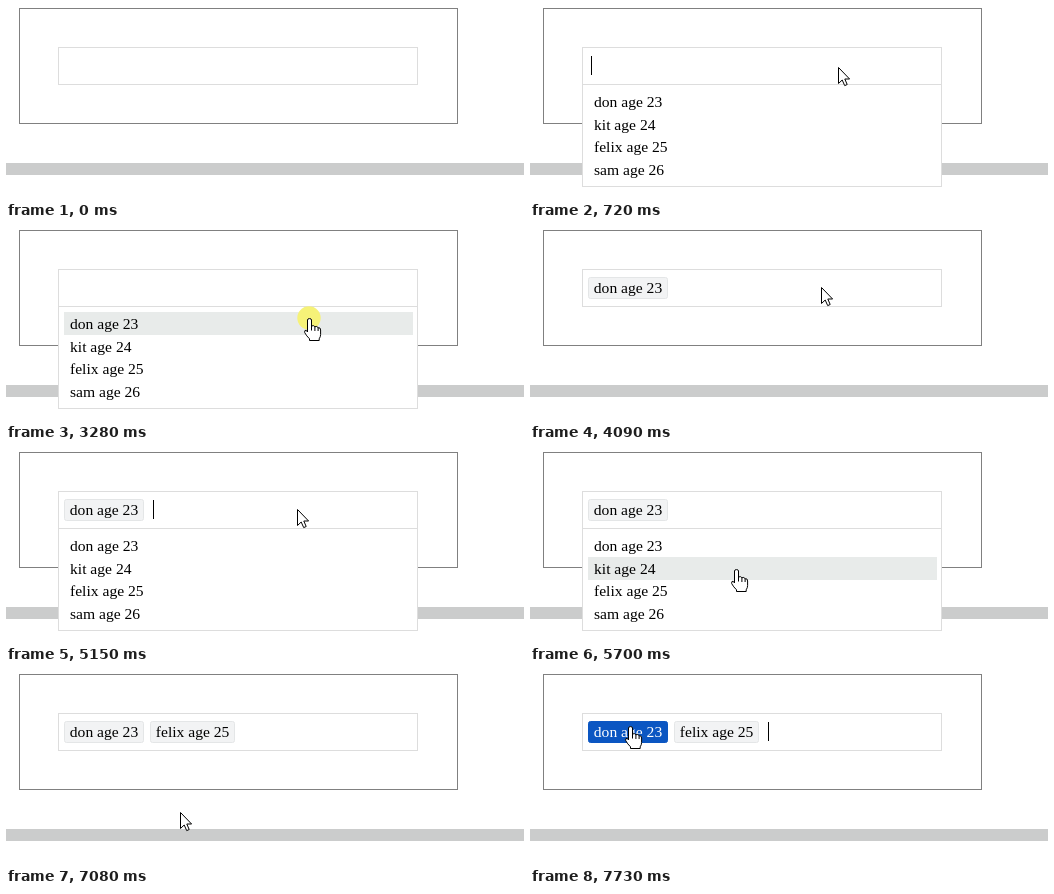
These frames come from a looping animation (518 px wide and 194 px high, 8 s). An HTML page:

```html
<!DOCTYPE html>
<html lang="en">
<head>
<meta charset="utf-8">
<title>Tag picker</title>
<style>
  html, body { margin: 0; width: 100%; height: 100%; overflow: hidden; background: #fff; }
  svg { display: block; width: 518px; height: 194px; }
  text { font: 15.6px "Liberation Serif", "Times New Roman", serif; fill: #000; white-space: pre; }
  .line { fill: #fff; stroke: #ddd; }
  .tag rect { fill: #f2f3f4; stroke: #e4e6e7; }
  .tag.hot rect { fill: #0b56c2; stroke: #0b56c2; }
  .tag.hot text { fill: #fff; }
  #arrow, #hand { fill: #fff; stroke: #000; stroke-linejoin: round; }
</style>
</head>
<body>
<svg viewBox="0 0 518 194">
  <rect y="157" width="518" height="12" fill="#cbcccc"/>
  <rect x="13.5" y="2.5" width="438" height="115" fill="#fff" stroke="#808080"/>
  <rect class="line" x="52.5" y="41.5" width="359" height="37"/>
  <g id="menu">
    <rect class="line" x="52.5" y="78.5" width="359" height="102"/>
    <rect id="hover" x="58" width="349" height="23" fill="#e8ebea"/>
  </g>
  <g id="tags"></g>
  <rect id="caret" y="50" width="1" height="19"/>
  <g id="mouse">
    <circle id="press" r="11.7" fill="#f6f278"/>
    <path id="arrow" d="M.5 -.5V15.5L4.2 12L6.7 17.6L9.2 16.5L6.8 11H11.6Z"/>
    <path id="hand" d="M-1.5 14V2Q-1.5 .6 .5 .6Q2.5 .6 2.5 2V8Q4.7 6.9 5.9 8.7Q8.1 7.8 9.1 9.7Q11.6 9.2 11.6 12V16.5Q11.6 18.8 10.2 20.8V22.5H.5V20.8Q-2.5 18-4.3 14.6Q-4.7 12-2.9 12.2ZM2.5 8V12.5M5.9 8.7V13M9.1 9.7V13"/>
  </g>
</svg>
<script>
const LOOP = 8000, HOLD = 130, BLINK = 525;
const LEFT = 52, ROW_TOP = 84, ROW_H = 22.5;
const people = ["don age 23", "kit age 24", "felix age 25", "sam age 26"];

const [openClick, firstPick, focusClick, secondPick] = [560, 3280, 4140, 6310];
const clicks = [openClick, firstPick, focusClick, secondPick];
const reopen = 5150;
const focuses = [...clicks.map(c => c + HOLD), reopen].sort((a, b) => a - b);

const enter = { x: 403, y: 196 };
const stops = [
  { at: 60, ms: 460, x: 308, y: 62 },
  { at: 2270, ms: 50, x: 308, y: 72 },
  { at: 2700, ms: 280, x: 303, y: 90 },
  { at: 3760, ms: 330, x: 291, y: 60 },
  { at: 5320, ms: 580, x: 174, y: 141 },
  { at: 7340, ms: 390, x: 100, y: 54 }
];

const $ = id => document.getElementById(id);
const show = (el, on) => { el.style.visibility = on ? "visible" : "hidden"; };
const ease = k => k * k * (3 - 2 * k);

function add(parent, name, attrs, text) {
  const el = document.createElementNS("http://www.w3.org/2000/svg", name);
  for (const key in attrs) el.setAttribute(key, attrs[key]);
  if (text) el.textContent = text;
  return parent.appendChild(el);
}

people.forEach((p, i) =>
  add($("menu"), "text", { x: 64, y: Math.round(101 + i * 22.6) }, p));

// Each tag follows the previous one and fits its label.
function makeTag(label, x, from) {
  const el = add($("tags"), "g", { class: "tag" });
  const box = add(el, "rect", { x: x + .5, y: 49.5, height: 21, rx: 2 });
  const text = add(el, "text", { x: x + 5.8, y: 65 }, label);
  const w = Math.floor(text.getComputedTextLength() + 12);
  box.setAttribute("width", w - 1);
  return { el, x, end: x + w, from };
}
const first = makeTag(people[0], LEFT + 6, firstPick + HOLD);
const second = makeTag(people[2], first.end + 6, secondPick + HOLD);
const tags = [first, second];

function pointer(t) {
  let { x, y } = enter;
  for (const s of stops) {
    const k = ease(Math.min(1, Math.max(0, (t - s.at) / s.ms)));
    x += (s.x - x) * k;
    y += (s.y - y) * k;
  }
  return [Math.round(x), Math.round(y)];
}

function draw(t) {
  const [x, y] = pointer(t);
  const pressed = clicks.some(c => t >= c && t < c + HOLD);
  const open = t >= openClick + HOLD && t < first.from || t >= reopen && t < second.from;
  const row = Math.floor((y - ROW_TOP) / ROW_H);
  const onRow = open && row >= 0 && row < people.length && x >= 58 && x < 407;

  let end = LEFT, onTag = false;
  for (const tag of tags) {
    const on = t >= tag.from;
    const hot = on && x >= tag.x && x < tag.end && y >= 49 && y < 71;
    show(tag.el, on);
    tag.el.classList.toggle("hot", hot);
    if (on) end = tag.end;
    onTag = onTag || hot;
  }

  $("menu").style.display = open ? "" : "none";
  show($("hover"), onRow);
  if (onRow) $("hover").setAttribute("y", Math.round(ROW_TOP + row * ROW_H));

  // The blink restarts with every focus.
  const focus = focuses.filter(f => f <= t).pop();
  const lit = Math.floor((t - focus) / BLINK) % 2 === 0;
  show($("caret"), lit && !pressed);
  $("caret").setAttribute("x", end + 9);

  $("mouse").setAttribute("transform", `translate(${x} ${y})`);
  show($("press"), pressed);
  show($("hand"), onRow || onTag);
  show($("arrow"), t >= 100 && !onRow && !onTag);
}

const begin = performance.now();
function tick() {
  draw((performance.now() - begin) % LOOP);
  requestAnimationFrame(tick);
}
tick();
</script>
</body>
</html>
```
